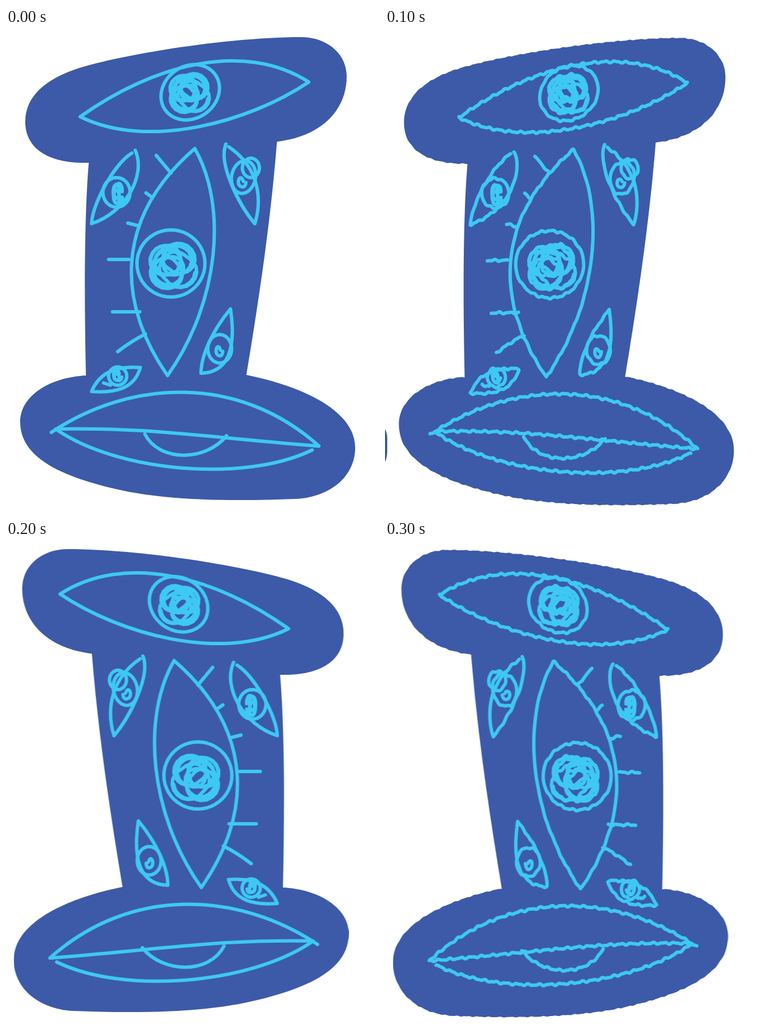
An HTML page that plays this animation: 658x851 px, repeating every 400 ms.

```html
<!DOCTYPE html>
<html lang="en">
<head>
<meta charset="utf-8">
<title>Eyes on a pillar</title>
<style>
  html, body { margin: 0; width: 100%; height: 100%; overflow: hidden; background: #fff; }
  svg { display: block; width: 100%; height: 100%; }
  .body { fill: #3c5aa8; }
  .line { fill: none; stroke: #3ec8f4; stroke-width: 6; stroke-linecap: round; stroke-linejoin: round; }
  #figure { animation: mirror .4s step-end infinite; }
  #calm { animation: first-half .2s step-end infinite; }
  #rippled { animation: second-half .2s step-end infinite; }
  #sliver { animation: second-quarter .4s step-end infinite; }
  @keyframes mirror {
    0% { transform: none; }
    50%, 100% { transform: translate(629.5px, 0) scale(-1, 1); }
  }
  @keyframes first-half { 0% { visibility: visible; } 50%, 100% { visibility: hidden; } }
  @keyframes second-half { 0% { visibility: hidden; } 50%, 100% { visibility: visible; } }
  @keyframes second-quarter {
    0% { visibility: hidden; }
    25% { visibility: visible; }
    50%, 100% { visibility: hidden; }
  }
</style>
</head>
<body>
<svg viewBox="0 0 658 851">
  <path id="sliver" class="body" d="M0 705Q4 712 4 722V744Q4 755 0 763Z"/>
  <g id="figure"><g id="calm"></g><g id="rippled"></g></g>
</svg>
<script>
const TAU = 2 * Math.PI;

const trace = (count, point) =>
  'M' + Array.from({ length: count + 1 }, (_, i) => point(i).map(v => v.toFixed(1)).join(' ')).join('L');

const ring = (cx, cy, rx, ry, tilt = 0) => trace(48, i => {
  const u = rx * Math.cos(TAU * i / 48), v = ry * Math.sin(TAU * i / 48);
  return [cx + u * Math.cos(tilt) - v * Math.sin(tilt), cy + u * Math.sin(tilt) + v * Math.cos(tilt)];
});

// Loops whose centre drifts slowly around the pupil
const scribble = (cx, cy, rx, ry, turns) => trace(turns * 24, i => {
  const a = TAU * i / 24;
  const swing = f => .62 * f(a) + .33 * f(.23 * a + 1) + .1 * f(2.7 * a);
  return [cx + rx * swing(Math.cos), cy + ry * swing(Math.sin)];
});

const body = `M478 200C560 190 601 142 601 85C601 45 566 16 520 16C400 16 215 44 130 70
  C70 89 34 120 34 165C34 215 80 239 146 237C138 330 138 480 141 611
  C80 614 25 645 25 693C25 760 110 792 200 812C290 832 410 832 510 828
  C575 825 616 786 616 738C616 668 510 627 424 610C444 490 466 350 478 200Z`;

const topEye = [
  'M131 156C260 64 420 22 534 95C430 165 250 215 131 156',
  ring(325, 113, 54, 46, -.6),
  scribble(323, 114, 37, 36, 8)
];

const middleEye = [
  'M285 611C200 490 185 340 333 212C390 310 378 480 285 611',
  ring(291, 414, 60, 59),
  scribble(294, 418, 44, 42, 8),
  'M265 224L291 255', 'M247 290L257 297', 'M215 343L231 347',
  'M181 407H217', 'M188 499H236', 'M197 569Q222 550 246 538'
];

const smallEyes = [
  'M222 220C190 240 152 310 151 344C210 325 248 260 228 215',
  ring(195, 289, 24, 26),
  scribble(197, 292, 9, 20, 3),
  'M388 204C374 238 410 310 439 344C454 295 442 242 393 209',
  ring(419, 262, 21, 29, .2),
  ring(432, 246, 15, 17),
  scribble(416, 268, 8, 13, 1),
  'M396 494C372 522 344 570 344 607C394 606 406 560 396 494',
  ring(377, 564, 21, 25),
  scribble(376, 565, 7, 13, 1),
  'M151 639C166 602 200 594 237 597C226 636 190 642 151 639',
  ring(197, 612, 16, 16),
  scribble(197, 611, 8, 10, 2),
  'M172 624L184 628'
];

const bottomEye = [
  'M80 711C220 618 410 608 552 735',
  'M88 705C250 702 330 717 550 735',
  'M92 708C200 780 420 800 540 742',
  'M245 714C270 763 352 763 389 717'
];

const lines = [...topEye, ...middleEye, ...smallEyes, ...bottomEye];

// Redraws a path with a vertical wave that sags towards the bottom
function ripple(d, height) {
  const path = document.createElementNS('http://www.w3.org/2000/svg', 'path');
  path.setAttribute('d', d);
  const length = path.getTotalLength(), count = Math.ceil(length / 2);
  return trace(count, i => {
    const { x, y } = path.getPointAtLength(length * i / count);
    const sag = 1.5 + 5 * (y / 780) ** 6;
    const wave = Math.sin(x * .33 + y * .04) + .6 * Math.sin(x * .58 - y * .05);
    return [x - .5, y + sag + height * wave];
  });
}

function draw(id, warp) {
  document.getElementById(id).innerHTML =
    `<path class="body" d="${warp(body, .5)}"/>` +
    lines.map(d => `<path class="line" d="${warp(d, 1.2)}"/>`).join('');
}

draw('calm', d => d);
draw('rippled', ripple);
</script>
</body>
</html>
```
